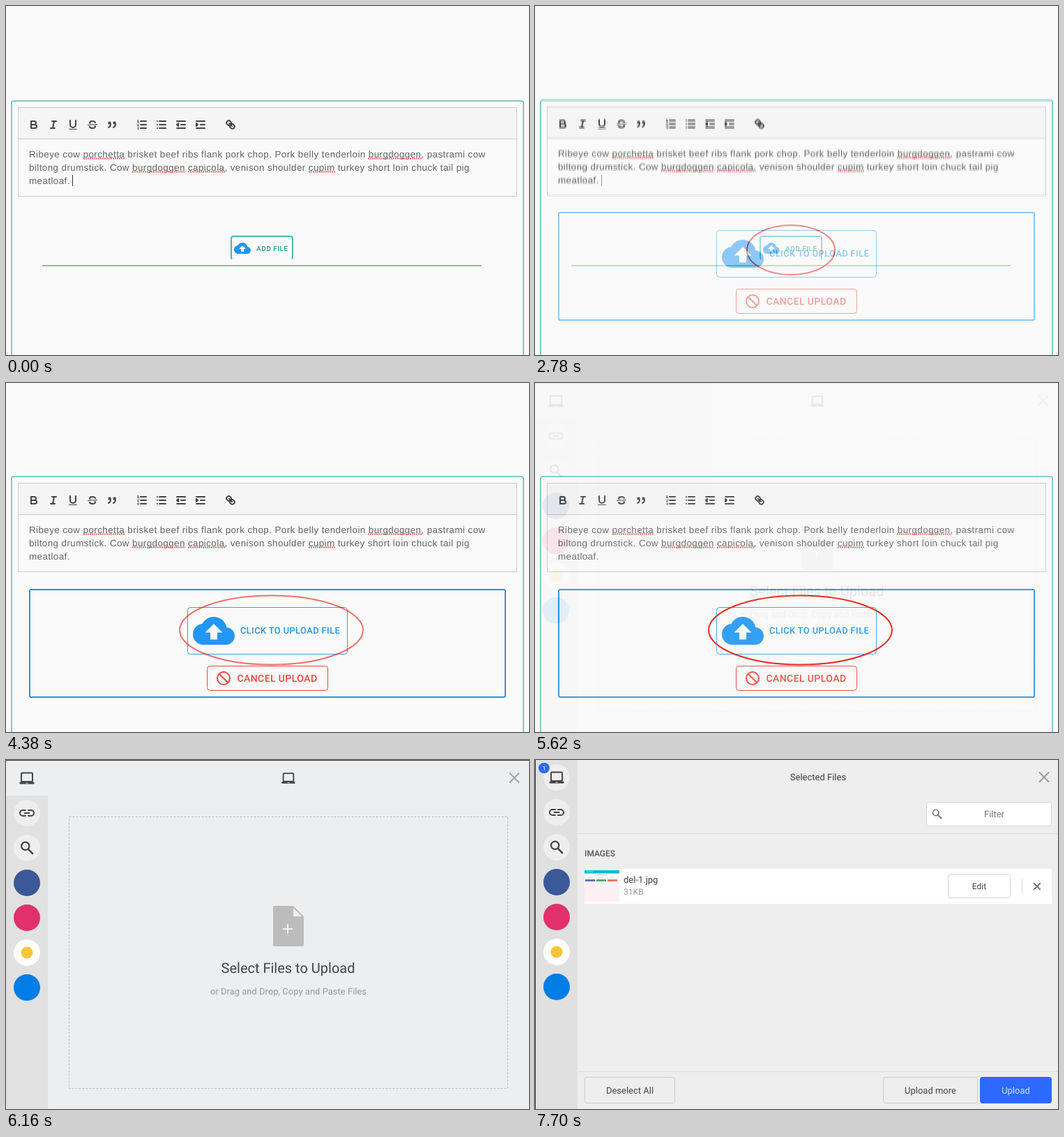
An HTML page for the animation above (8000 ms loop, 750 by 500 pixels).

```html
<!DOCTYPE html>
<html lang="en">
<head>
<meta charset="utf-8">
<title>File upload walkthrough</title>
<style>
  html, body { margin: 0; width: 100%; height: 100%; overflow: hidden; background: #fafafa; }
  svg { display: block; width: 750px; height: 500px; }
  text { font-family: Roboto, sans-serif; text-rendering: geometricPrecision; white-space: pre; }
  .body { font: 13.4px "Liberation Sans", Helvetica, Arial, sans-serif; letter-spacing: .42px; fill: #626262; }
  .line { fill: none; stroke-linecap: round; stroke-linejoin: round; }
</style>
</head>
<body>
<svg id="stage" viewBox="0 0 750 500" xmlns="http://www.w3.org/2000/svg"></svg>
<script>
const LOOP = 8000, FADE = 600;

// --- drawing helpers ---
const box = (x, y, w, h, fill, stroke = 'none', rx = 0, sw = 1) =>
  `<rect x="${x}" y="${y}" width="${w}" height="${h}" rx="${rx}" fill="${fill}" stroke="${stroke}" stroke-width="${sw}"/>`;
const disc = (x, y, r, fill) => `<circle cx="${x}" cy="${y}" r="${r}" fill="${fill}"/>`;
const line = (d, stroke, sw = 2, extra = '') =>
  `<path class="line" d="${d}" stroke="${stroke}" stroke-width="${sw}" ${extra}/>`;
const shape = (d, fill) => `<path d="${d}" fill="${fill}"/>`;
const at = (x, y, inner, scale = 1) => `<g transform="translate(${x} ${y}) scale(${scale})">${inner}</g>`;
const text = (s, x, y, size, fill, { anchor = 'start', weight = 400, gap = 0 } = {}) =>
  `<text x="${x}" y="${y}" font-size="${size}" fill="${fill}" text-anchor="${anchor}" font-weight="${weight}" letter-spacing="${gap}">${s}</text>`;
const mid = { anchor: 'middle' };
const ring = (x, y, rx, ry) =>
  `<ellipse cx="${x}" cy="${y}" rx="${rx}" ry="${ry}" fill="none" stroke="#e2190f" stroke-width="2"/>`;

// --- icons ---
const INK = '#444';
const ink = (d, sw) => line(d, INK, sw);
const bars = x => ink(`M${x} 4H15M${x} 9H15M${x} 14H15`);
const quote = x => box(x, 5, 3, 3, INK, INK, .5) + ink(`M${x + 3} 8c0 4-3 5-3 5`) ;
const indent = arrow => ink('M3 4H15M9 9H15M3 14H15') + `<path d="${arrow}" fill="${INK}" stroke="${INK}" stroke-width="2" stroke-linejoin="round"/>`;

const tools = [
  [40, ink('M5 4h4.5a2.5 2.5 0 0 1 0 5H5zM5 9h5.5a2.5 2.5 0 0 1 0 5H5z')],
  [68, ink('M7 4H13M5 14H11M8 14L10 4')],
  [96, ink('M5 3V9a4 4 0 0 0 8 0V3') + box(3, 15, 12, 1, INK, 'none', .5)],
  [124, ink('M13 6C12.5 4.8 11 4 9 4 6.7 4 5 5 5 6.5 5 8 6.5 8.7 9 9s4 1 4 2.5S11.3 14 9 14c-2 0-3.5-.8-4-2')
    + line('M15.5 8.5L2.5 9.5', '#f5f5f5', 3) + ink('M15.5 8.5L2.5 9.5', 1)],
  [152, quote(4) + quote(11)],
  [195, bars(7) + ink('M2.5 3L3.5 2.5V5.5M2.5 5.5h2M2.5 8.2c.6-1 1.9-.7 1.8.2 0 .8-1.8 1.6-1.8 2.1h2M2.5 13c.5-.8 1.9-.6 1.8.3q0 .6-.6.7 .7.1.7.8c-.1.9-1.5.9-1.9 0', 1)],
  [223, bars(6) + ink('M3 4h.01M3 9h.01M3 14h.01')],
  [251, indent('M5 7V11L3 9z')],
  [279, indent('M3 7V11L5 9z')],
  [322, ink('M7 7L11 11')
    + ink('M8.9 4.6a3.5 3.5 0 0 1 .36 4.7A3.5 3.5 0 0 1 4.6 8.9C3.2 7.5 2 6.4 4.2 4.2S7.5 3.2 8.9 4.6z')
    + ink('M13.4 9.1a3.5 3.5 0 0 0-4.7-.36 3.5 3.5 0 0 0 .36 4.7c1.4 1.4 2.5 2.5 4.7.36S14.8 10.5 13.4 9.1z')],
];

const cloud = shape('M19.35 10.04C18.67 6.59 15.64 4 12 4 9.11 4 6.6 5.64 5.35 8.04 2.34 8.36 0 10.91 0 14c0 3.31 2.69 6 6 6h13c2.76 0 5-2.24 5-5 0-2.64-2.05-4.78-4.65-4.96zM14 13v4h-4v-4H7l5-5 5 5h-3z', '#2196f3');
const laptop = box(-8, -7.5, 16, 12.5, 'none', INK, 1, 2) + box(-10.5, 5.5, 21, 3, INK, 'none', 1.2)
  + box(-1.5, 6.5, 3, 1, '#eee');
const chain = ink('M-2-4H-6a4 4 0 0 0 0 8H-2M2-4H6a4 4 0 0 1 0 8H2M-3.5 0H3.5');
const lens = color => `<circle cx="-2.3" cy="-2.7" r="5.6" fill="none" stroke="${color}" stroke-width="2.2"/>`
  + line('M2 1.8L8 8', color, 2.6);
const cross = (x, y, r, color) =>
  line(`M${x - r} ${y - r}L${x + r} ${y + r}M${x + r} ${y - r}L${x - r} ${y + r}`, color, 2, 'style="stroke-linecap:butt"');

// --- scenes ---
const paragraph = [
  'Ribeye cow porchetta brisket beef ribs flank pork chop. Pork belly tenderloin burgdoggen, pastrami cow',
  'biltong drumstick. Cow burgdoggen capicola, venison shoulder cupim turkey short loin chuck tail pig',
  'meatloaf.',
];
const misspelt = [[111, 170, 0], [519, 596, 0], [181, 257, 1], [261, 315, 1], [434, 472, 1]];

const editor = dy => box(0, 0, 750, 500, '#fafafa') + at(0, dy,
  box(8, 136, 734, 420, 'none', '#80cbc4', 3, 2)
  + box(17.5, 145.5, 715, 45, '#f5f5f5', '#ccc')
  + box(17.5, 190.5, 715, 82, 'none', '#ccc')
  + tools.map(([x, icon]) => at(x - 9, 161, icon)).join('')
  + paragraph.map((s, i) => `<text class="body" x="33" y="${217 + 19 * i}">${s}</text>`).join('')
  + misspelt.map(([a, b, row]) =>
      line(`M${a} ${218.6 + 19 * row}H${b}`, '#ea6560', 2, 'stroke-dasharray="2 1" style="stroke-linecap:butt"')).join(''));

const addFile = editor(0)
  + box(95, 242, 1, 16, '#333')
  + line('M324 362.5Q323 361.5 323 360V333a3 3 0 0 1 3-3H408a3 3 0 0 1 3 3V360Q411 361.5 410 362.5', '#4db6ac', 2, 'style="stroke-linecap:butt"')
  + at(327, 335, cloud)
  + text('ADD FILE', 359, 350.5, 10, '#1f9d90', { weight: 500, gap: .5 })
  + box(52, 371, 630, 2, '#81c784');

const chooser = editor(-2)
  + box(34, 296, 682, 154, 'none', '#2f93da', 2, 2)
  + box(260.5, 321.5, 229, 67, 'none', '#3c9cdc', 4)
  + at(268, 325, cloud, 2.5)
  + text('CLICK TO UPLOAD FILE', 336, 359, 12.8, '#2391e0', { weight: 500, gap: .44 })
  + box(288.5, 405.5, 173, 35, 'none', '#e5483a', 4)
  + `<circle cx="312" cy="423" r="9" fill="none" stroke="#e5483a" stroke-width="2"/>`
  + line('M305.7 416.7L318.3 429.3', '#e5483a')
  + text('CANCEL UPLOAD', 331.5, 428, 14, '#e5483a', { weight: 500, gap: .4 });

const sources = (x, y) =>
  ['#eee', '#eee', '#3b5998', '#e1306c', '#fff', '#007ee5'].map((c, i) => disc(x, y + 50 * i, 19, c)).join('')
  + at(x, y, chain) + at(x, y + 50, lens(INK)) + disc(x, y + 200, 8.5, '#fbc53a');

const picker = box(0, 0, 750, 500, '#edeef0')
  + box(0, 51, 60, 449, '#e1e1e1')
  + box(0, 0, 750, 1, '#3a3a3a')
  + at(30, 26, laptop) + at(405, 26, laptop, .92)
  + sources(30, 76)
  + cross(729, 25.5, 7, '#a2a2a2')
  + `<rect x="90.5" y="81.5" width="629" height="389" fill="none" stroke="#bdbdbd" stroke-dasharray="3 2"/>`
  + shape('M385 209H412L427 224V265a2 2 0 0 1-2 2H385a2 2 0 0 1-2-2V211a2 2 0 0 1 2-2z', '#bcbcbc')
  + shape('M412 212V224H424z', '#f2f2f3')
  + line('M397 242H411M404 235V249', '#f2f2f3', 2, 'style="stroke-linecap:butt"')
  + text('Select Files to Upload', 404.5, 305, 20, '#444', mid)
  + text('or Drag and Drop, Copy and Paste Files', 405, 336, 13, '#9b9b9b', mid);

const thumb = box(71, 158, 50, 45, '#fafcfc')
  + box(71, 158, 50, 4.5, '#00bcd4') + box(73, 159.5, 10, 1, '#8be0ec')
  + box(89, 164, 14, 1, '#bbb')
  + [['#6573b8', 72], ['#52ad78', 88], ['#ee7562', 104]].map(([c, x]) =>
      box(x + 3, 167.5, 7, 1, '#ddd') + box(x, 171, 14, 3, c)).join('')
  + box(71, 175, 50, 28, '#fdf0f3');

const button = (label, x, w, fill, border, color) =>
  box(x + .5, 454.5, w - 1, 37, fill, border, 3) + text(label, x + w / 2, 478, 13, color, mid);

const selected = box(0, 0, 750, 500, '#eee')
  + box(0, 0, 61, 500, '#e0e0e0') + box(0, 0, 1, 500, '#3a3a3a')
  + disc(31, 25, 19, '#eee') + at(31, 25, laptop)
  + sources(31, 75)
  + box(5, 4, 16, 15, '#2e69ff', 'none', 7.5) + text('1', 13, 15, 9, '#fff', mid)
  + text('Selected Files', 406, 29, 13, '#3c3c3c', mid)
  + cross(730, 24.5, 7, '#999')
  + box(561.5, 60.5, 179, 34, '#fff', '#d6d6d6', 3)
  + at(576.5, 77.5, lens('#777'), .75)
  + text('Filter', 658.5, 82, 13, '#777', mid)
  + box(61, 105, 689, 1, '#dcdcdc') + box(61, 446, 689, 1, '#dcdcdc')
  + text('IMAGES', 71, 138, 12, '#555', { weight: 500 })
  + box(71, 156, 670, 50, '#fff') + thumb
  + text('del-1.jpg', 127, 176, 13, '#3c3c3c')
  + text('31KB', 127, 193, 12, '#999')
  + box(592.5, 163.5, 89, 34, '#fff', '#d4d4d4', 3)
  + text('Edit', 637, 185, 12, '#3c3c3c', mid)
  + box(698, 171, 1, 20, '#d8d8d8')
  + cross(720, 181, 4.8, '#777')
  + button('Deselect All', 71, 130, '#eee', '#ccc', '#444')
  + button('Upload more', 499, 136, '#eee', '#ccc', '#444')
  + button('Upload', 638, 103, '#2e69ff', '#2e69ff', '#d3dfff');

// Each layer fades in over the ones below: [start ms, content]
const layers = [
  [null, addFile],
  [1000, ring(367, 349.5, 63, 35.5)],
  [2540, chooser],
  [4080, ring(380.5, 354, 131.5, 49.5)],
  [5620, picker],
  [7160, selected],
];

const stage = document.getElementById('stage');
stage.innerHTML = layers.map(([, content]) => `<g>${content}</g>`).join('');
layers.forEach(([start], i) => {
  if (start === null) return;
  stage.children[i].animate([
    { opacity: 0, offset: 0 },
    { opacity: 0, offset: start / LOOP, easing: 'steps(10, jump-start)' },
    { opacity: 1, offset: (start + FADE) / LOOP },
    { opacity: 1, offset: 1 },
  ], { duration: LOOP, iterations: Infinity });
});
</script>
</body>
</html>
```
